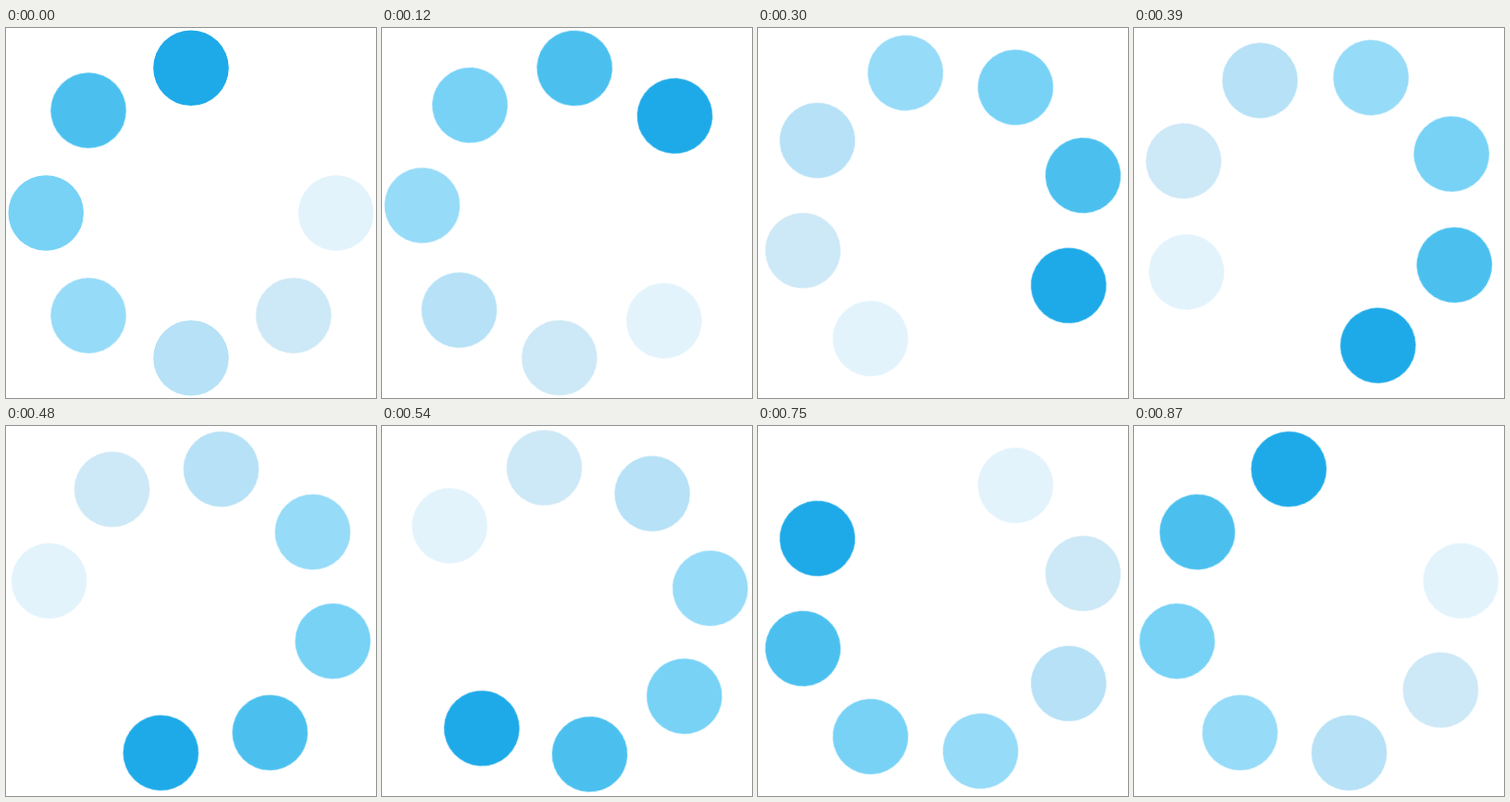
Animation of 400x400 px, one loop 900 ms. Source, as an HTML page:

```html
<!DOCTYPE html>
<html lang="en">
<head>
<meta charset="utf-8">
<title>Loading spinner</title>
<style>
  html, body { margin: 0; width: 100%; height: 100%; overflow: hidden; background: #fff; }
  svg { display: block; width: 100%; height: 100%; }
  .ring { transform-origin: 200px 200px; animation: spin 900ms steps(30) infinite; }
  @keyframes spin { to { transform: rotate(360deg); } }
</style>
</head>
<body>
<svg viewBox="0 0 400 400">
  <defs><circle id="dot" cx="200" cy="43.2" r="40.8"/></defs>
  <g class="ring">
    <use href="#dot" fill="#1eaae8"/>
    <use href="#dot" fill="#4bc0ef" transform="rotate(-45 200 200)"/>
    <use href="#dot" fill="#77d2f6" transform="rotate(-90 200 200)"/>
    <use href="#dot" fill="#96dbf8" transform="rotate(-135 200 200)"/>
    <use href="#dot" fill="#b6e1f6" transform="rotate(-180 200 200)"/>
    <use href="#dot" fill="#cde8f6" transform="rotate(-225 200 200)"/>
    <use href="#dot" fill="#e2f3fc" transform="rotate(-270 200 200)"/>
  </g>
</svg>
</body>
</html>
```
